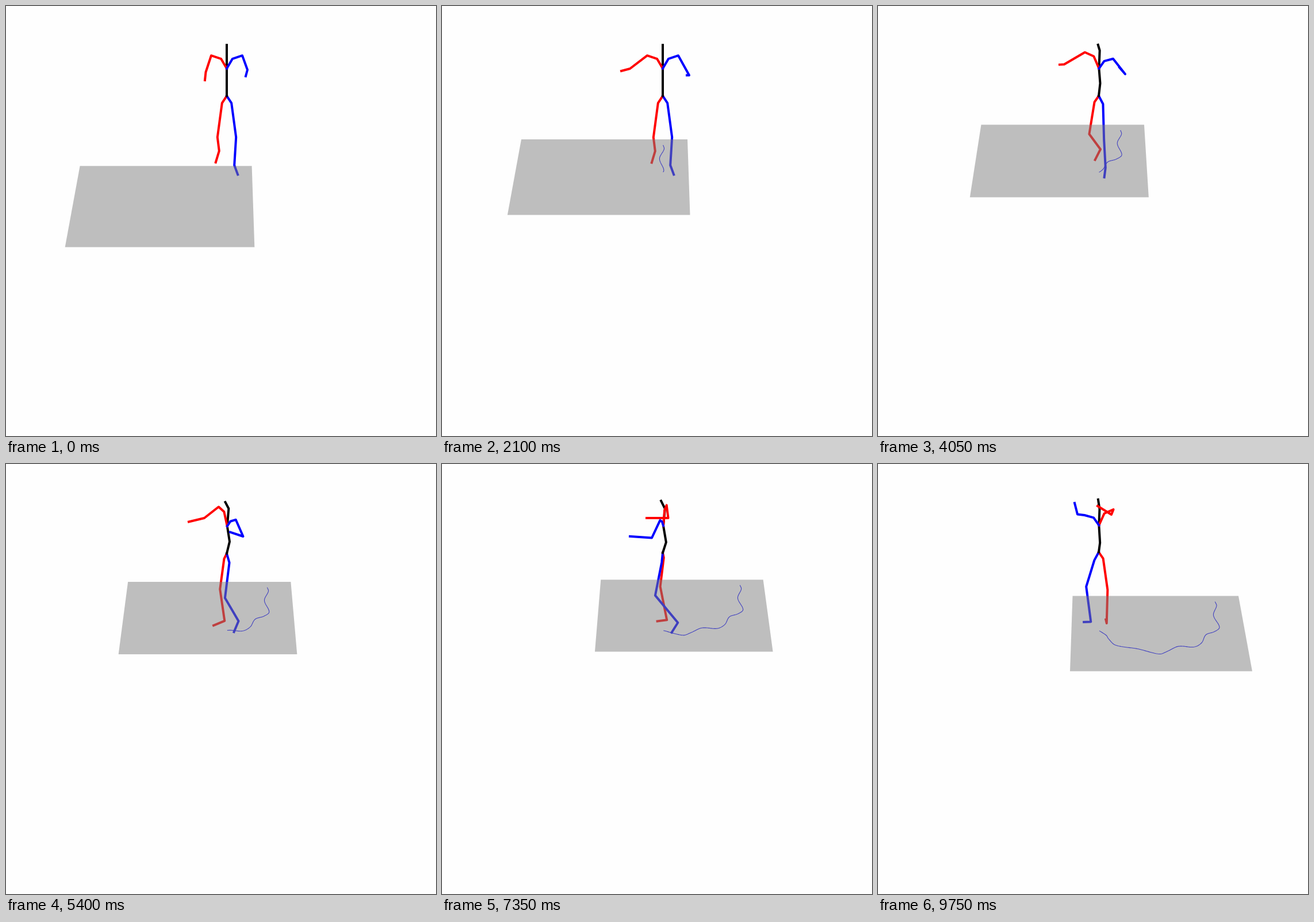
Recreate the animation shown at these times as an HTML page. Size 748x748 px, loop 9.8 s.

```html
<!DOCTYPE html>
<html lang="en">
<head>
<meta charset="utf-8">
<title>Walking figure</title>
<style>
html, body { margin: 0; width: 100%; height: 100%; overflow: hidden; background: #fefefe; }
svg { display: block; width: 100%; height: 100%; }
path { fill: none; stroke-width: 4; stroke-linejoin: round; stroke-linecap: square; }
</style>
</head>
<body>
<svg viewBox="0 0 748 748">
  <path id="trail" stroke="#00f" style="stroke-width:1.1"/>
  <path id="redLeg" stroke="#f00"/>
  <path id="blueLeg" stroke="#00f"/>
  <path id="spine" stroke="#000"/>
  <path id="redArm" stroke="#f00"/>
  <path id="blueArm" stroke="#00f"/>
  <path id="floor" style="fill:#808080;fill-opacity:.5;stroke:none"/>
</svg>
<script>
const LOOP = 9800, STEP = 50, CX = 384, GROUND = 289.5;
const { sin, cos, PI } = Math;
const wave = p => cos(2 * PI * p);

// Smooth curve through rows of [seconds, ...values]
function track(rows) {
  const slope = (i, k) => {
    const a = rows[Math.max(i - 1, 0)], b = rows[Math.min(i + 1, rows.length - 1)];
    return (b[k] - a[k]) / (b[0] - a[0]);
  };
  return t => {
    let i = 0;
    while (i < rows.length - 2 && t >= rows[i + 1][0]) i++;
    const a = rows[i], b = rows[i + 1], h = b[0] - a[0];
    const s = Math.min(1, (t - a[0]) / h), r = 1 - s;
    return a.slice(1).map((v, j) => {
      const k = j + 1;
      return r * r * (1 + 2 * s) * v + s * s * (3 - 2 * s) * b[k]
        + s * r * h * (r * slope(i, k) - s * slope(i + 1, k));
    });
  };
}

// Turning points of the walk over the floor, as seen from its end
const route = track([
  [0, 586.5, 240], [0.3, 589, 246.5], [1, 583.5, 263], [1.95, 594, 284],
  [2.4, 585.5, 291.5], [3, 570.5, 297], [3.7, 563, 311], [4.4, 549.5, 318.3],
  [5.4, 522, 317.3], [6, 503, 326], [6.45, 489, 330.5], [7.35, 453, 321.8],
  [8.5, 413, 315], [9, 401, 304], [9.3, 397, 298], [9.75, 384, 289.5]
]);

// Arm gestures: red elbow, red hand, blue elbow, blue hand
const arms = track([
  [0, 347.5, 115, 346, 129, 420, 111, 417, 122],
  [2.1, 327, 109, 312, 113, 430, 120.5, 426, 120.5],
  [4.05, 324, 101.5, 316, 102, 430, 118.5, 420, 107],
  [5.4, 345, 94, 318, 100.5, 412.5, 126, 390, 118.5],
  [7.35, 393.5, 94, 356, 94, 365, 128.5, 327, 126],
  [8.8, 389, 92, 360, 90, 340, 110.5, 316, 102],
  [9.75, 406, 88, 382, 73, 347, 87.5, 342, 68]
]);

// Walks straight at the viewer, then turns at a steady rate
const heading = t => Math.max(0, t - 3) * 23.5 * PI / 180;

// Steps forward, to the body's left and up from a point
const place = ([x, y], a, fwd, side, up) => [
  x + side * cos(a) - fwd * sin(a),
  y + (fwd * cos(a) + side * sin(a)) / 2 - up * 0.866
];

// p is the gait phase: 0 standing on the leg, 0.5 swinging it through
function leg(pelvis, a, side, p) {
  const thigh = 0.14 + 0.18 * sin(2 * PI * (p - 0.44));
  const shin = 0.27 + 0.24 * wave(p - 0.41) + 0.18 * wave(2 * (p - 0.41));
  const pitch = 0.15 + 1.4 * shin;
  const hip = place(pelvis, a, 0, side * 8.2, -14.5);
  const knee = place(hip, a, 64 * sin(thigh), side * 8, -64 * cos(thigh));
  const ankle = place(knee, a, -65 * sin(shin), side * -3, -65 * cos(shin));
  const toe = place(ankle, a, 20 * cos(pitch), side * 6, -20 * sin(pitch));
  return [pelvis, hip, knee, ankle, toe];
}

function arm(chest, a, side, [ex, ey, hx, hy]) {
  const shoulder = place(chest, a, 0, side * 27, 26);
  const collar = [
    chest[0] + 0.37 * (shoulder[0] - chest[0]),
    chest[1] + 0.75 * (shoulder[1] - chest[1])
  ];
  return [chest, collar, shoulder, [ex, ey], [hx, hy]];
}

// Floor perspective: scale grows evenly from the horizon downwards
const scale = y => (y + 1114) / 4.66;

// Moves a floor point so that the root stands on the fixed ground spot
function view([x, y], [rx, ry]) {
  const side = (x - CX) / scale(y) - (rx - CX) / scale(ry);
  const depth = 1 / scale(y) + 1 / scale(GROUND) - 1 / scale(ry);
  return [CX + side / depth, 4.66 / depth - 1114];
}

const CORNERS = [[338.5, 229.5], [627, 229.5], [651, 360.5], [334, 360.5]];
const steps = Array.from({ length: LOOP / STEP }, (_, i) => route(i * STEP / 1000));

function draw(id, points) {
  const d = points.map(p => p.map(v => v.toFixed(2)).join(" ")).join("L");
  document.getElementById(id).setAttribute("d", d && "M" + d);
}

function render(n) {
  const t = n * STEP / 1000, root = steps[n], a = heading(t);
  const gait = 0.478 * t - 0.06, hands = arms(t);
  const pelvis = [CX, 154.8 + 1.6 * cos(a)];
  const waist = place(pelvis, a, -6, 0, 22);
  const chest = place(pelvis, a, -1, 0, 54.5);
  const neck = place(chest, a, -3, 0, 34.5);
  const head = place(neck, a, 7, 0, 15);
  draw("floor", CORNERS.map(p => view(p, root)));
  draw("trail", steps.slice(0, n).map(p => view(p, root)));
  draw("redLeg", leg(pelvis, a, -1, gait + 0.5));
  draw("blueLeg", leg(pelvis, a, 1, gait));
  draw("spine", [pelvis, waist, chest, neck, head]);
  draw("redArm", arm(chest, a, -1, hands.slice(0, 4)));
  draw("blueArm", arm(chest, a, 1, hands.slice(4)));
}

const start = performance.now();
function tick() {
  const t = (performance.now() - start) % LOOP;
  render(Math.floor(t / STEP));
  requestAnimationFrame(tick);
}
tick();
</script>
</body>
</html>
```
